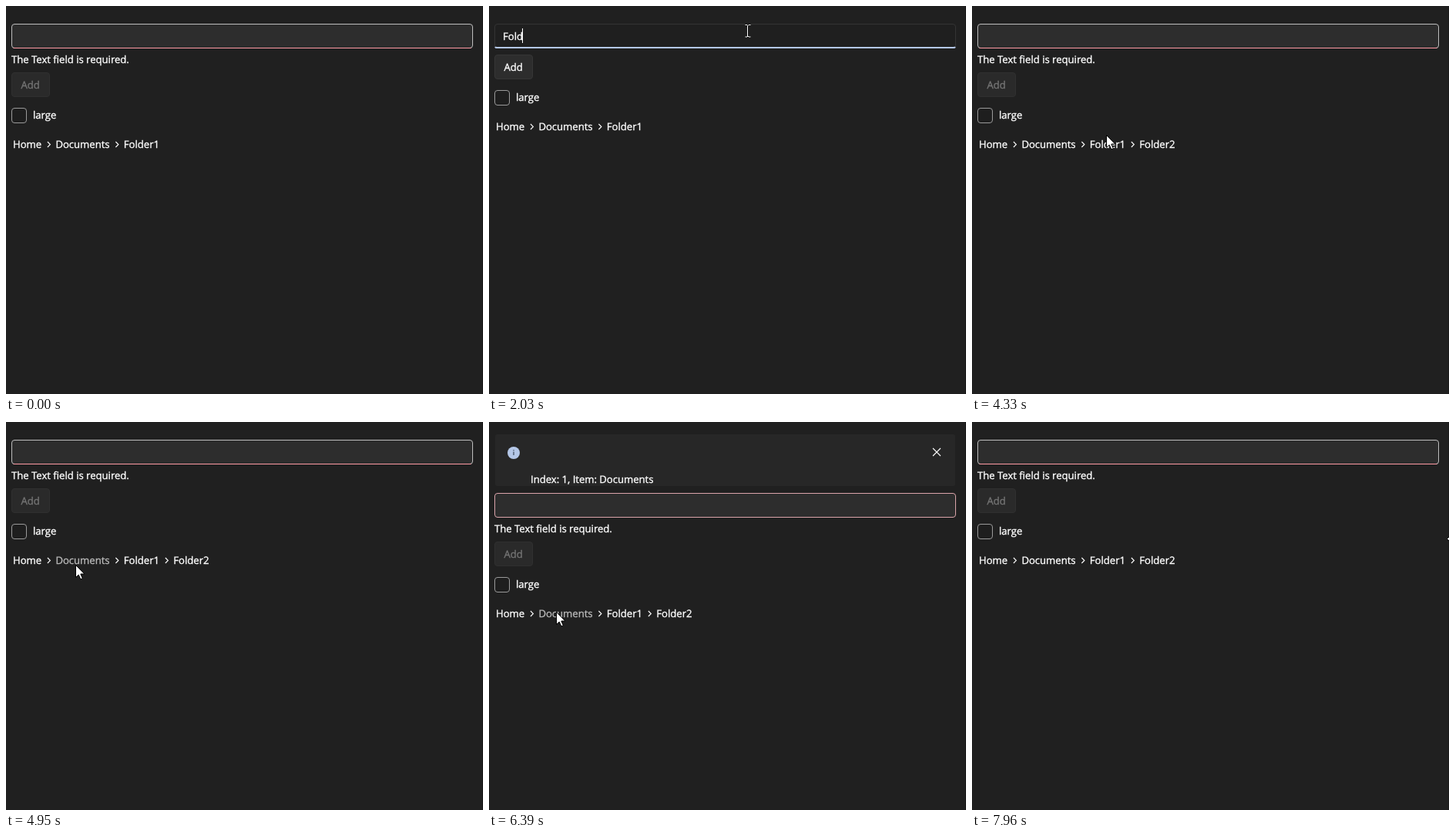
Write an HTML page that moves like this. It is 619x503 px and loops after 8 s.

```html
<!DOCTYPE html>
<html lang="en">
<head>
<meta charset="utf-8">
<title>Breadcrumb demo</title>
<style>
  html, body { margin: 0; width: 100%; height: 100%; overflow: hidden; background: #202020; }
  svg { display: block; width: 619px; height: 503px; }
  text {
    font: 13.1px "Open Sans", "Noto Sans", sans-serif;
    stroke-width: .35px; text-rendering: geometricPrecision; white-space: pre;
  }
</style>
</head>
<body>
<svg id="stage" viewBox="0 0 619 503"></svg>
<script>
const LOOP = 8000, STEP = 70, BLINK = 530;
const FOCUS = 890, TYPE = 1630, KEY_GAP = 130, PRESS = 3710, ADDED = 3850;
const SHOW = 5370, SECOND = 6320, CLOSE = 7200, LEAVE = 7760, EDGE = 7960;
const WORD = 'Folder2', CRUMBS = ['Home', 'Documents', 'Folder1', WORD];

const stage = document.getElementById('stage');
const pen = document.createElement('canvas').getContext('2d');
pen.font = '13.1px "Open Sans", "Noto Sans", sans-serif';
const textWidth = s => pen.measureText(s).width;
const within = (v, a, b) => v >= a && v < b;
const easeOut = p => Math.sin(p * Math.PI / 2);

// The pointer glides from spot to spot and rests in between.
const glide = (start, end, x, y) => ({ start, end, x, y });
const glides = [
  glide(120, 120, 338, 353),
  glide(120, FOCUS, 308, 43),
  glide(960, 1160, 336, 32),
  glide(3220, 3570, 39, 84),
  glide(ADDED, 4060, 124, 156),
  glide(4260, 4540, 256, 188),
  glide(4540, 5160, 43, 186),
  glide(5440, 5770, 85, 206),
  glide(6040, 6250, 88, 247),
  glide(6390, 6940, 555, 41),
  glide(6940, 7080, 578, 39),
  glide(7340, 7690, 611, 129)
];

function pointerAt(t) {
  if (!within(t, glides[0].start, LEAVE)) return null;
  const i = glides.findLastIndex(g => t >= g.start);
  const to = glides[i], from = glides[i - 1] || to;
  const elapsed = Math.floor((t - to.start) / STEP) * STEP;
  const k = t >= to.end ? 1 : easeOut(elapsed / (to.end - to.start));
  return { x: Math.round(from.x + (to.x - from.x) * k), y: Math.round(from.y + (to.y - from.y) * k) };
}

const label = (x, y, s, ink = '#fff') => `<text x="${x}" y="${y}" fill="${ink}" stroke="${ink}">${s}</text>`;
const box = (x, y, w, h, fill, stroke) =>
  `<rect x="${x + .5}" y="${y + .5}" width="${w - 1}" height="${h - 1}" rx="3.5" fill="${fill}" stroke="${stroke}"/>`;
const line = (d, color, w = 1) => `<path d="${d}" fill="none" stroke="${color}" stroke-width="${w}"/>`;

function messageBar(item) {
  return `<rect x="8" y="16" width="597" height="67" rx="3" fill="#272727"/>
    <circle cx="32" cy="40" r="8" fill="#b4c7e7"/>
    ${line('M32 36V37.3M32 38.5V43', '#3b4658', 1.2)}
    ${line('M576 34L586 44M586 34L576 44', '#fff', 1.1)}
    ${label(54, 79, item)}`;
}

function field(y, { value, focused, hover, caret, barOpen }) {
  const invalid = !value;
  const fill = focused ? '#1f1f1f' : hover ? '#323232' : '#2d2d2d';
  const border = !invalid ? '#343434' : barOpen ? '#dba4aa' : '#bdbdbd';
  let out = box(7, y, 599, 32, fill, border);
  if (focused) out += line(`M8 ${y + 30}Q8.5 ${y + 31} 10 ${y + 31}H603Q604.5 ${y + 31} 605 ${y + 30}`, '#b4c7e7', 2);
  else if (!barOpen) out += line(`M9.5 ${y + 31.5}H603.5`, invalid ? '#ff99a4' : '#9a9a9a');
  out += label(18, y + 21, value);
  if (caret) out += `<rect x="${Math.floor(17.5 + textWidth(value))}" y="${y + 6}" width="1" height="19" fill="#fff"/>`;
  return out;
}

function addButton(y, disabled, pressed) {
  const [fill, border, ink] = disabled ? ['#2a2a2a', '#303030', '#757575']
    : pressed ? ['#323232', '#383838', '#cfcfcf'] : ['#2d2d2d', '#363636', '#fff'];
  return box(7, y, 50, 32, fill, border) + label(19.5, y + 21, 'Add', ink);
}

function breadcrumb(y, count, pointer) {
  let x = 9, out = '';
  CRUMBS.slice(0, count).forEach((name, i) => {
    if (i) out += line(`M${x - 10.5} ${y - 8}l3.5 3.5l-3.5 3.5`, '#fff', 1.1);
    const end = x + textWidth(name);
    const hover = pointer && within(pointer.x, x, end) && within(pointer.y, y - 15, y + 7);
    out += label(x, y, name, hover ? '#b8b8b8' : '#fff');
    x = end + 18.3;
  });
  return out;
}

function cursor({ x, y }, beam) {
  if (beam) {
    const d = `M${x - 3.5} ${y - 7.5}h2.5l1 1l1 -1h2.5M${x - .5} ${y - 6.5}v14M${x - 3.5} ${y + 8}h2.5l1 -1l1 1h2.5`;
    return line(d, '#111', 2.4) + line(d, '#fff');
  }
  return `<path transform="translate(${x - .5} ${y - .5})" d="M0 0V16L3.7 12.6L6.3 18.3L8.8 17.2L6.3 11.5H11.3Z"
    fill="#fff" stroke="#000"/>`;
}

const resizeTip = '<path d="M616.5 151.5L620 148V155Z" fill="#fff" stroke="#000"/>';

function scene(t) {
  const pointer = pointerAt(t);
  const barOpen = within(t, SHOW, CLOSE);
  const top = barOpen ? 92 : 23;
  const typed = t < ADDED ? Math.max(0, Math.min(WORD.length, Math.floor((t - TYPE) / KEY_GAP) + 1)) : 0;
  const value = WORD.slice(0, typed);
  const focused = within(t, FOCUS, PRESS);
  const lastEdit = typed ? TYPE + (typed - 1) * KEY_GAP : FOCUS;
  const caret = focused && (t - lastEdit) % (2 * BLINK) < BLINK;
  const hover = !!pointer && within(pointer.x, 7, 606) && within(pointer.y, top, top + 32);
  const below = top + (typed ? 0 : 23);

  return (barOpen ? messageBar(t < SECOND ? 'Index: 0, Item: Home' : 'Index: 1, Item: Documents') : '')
    + field(top, { value, focused, hover, caret, barOpen })
    + (typed ? '' : label(7, top + 51, 'The Text field is required.'))
    + addButton(below + 40, !typed, within(t, PRESS, ADDED))
    + box(7, below + 86, 20, 20, '#1e1e1e', '#9a9a9a')
    + label(35, below + 100, 'large')
    + breadcrumb(below + 138, t < ADDED ? 3 : 4, pointer)
    + line('M618.5 0V503', '#191919')
    + (pointer ? cursor(pointer, hover) : '')
    + (t >= EDGE ? resizeTip : '');
}

let shown = '';
function frame(now) {
  const markup = scene(now % LOOP);
  if (markup !== shown) stage.innerHTML = shown = markup;
  requestAnimationFrame(frame);
}
stage.innerHTML = shown = scene(0);
requestAnimationFrame(frame);
</script>
</body>
</html>
```
